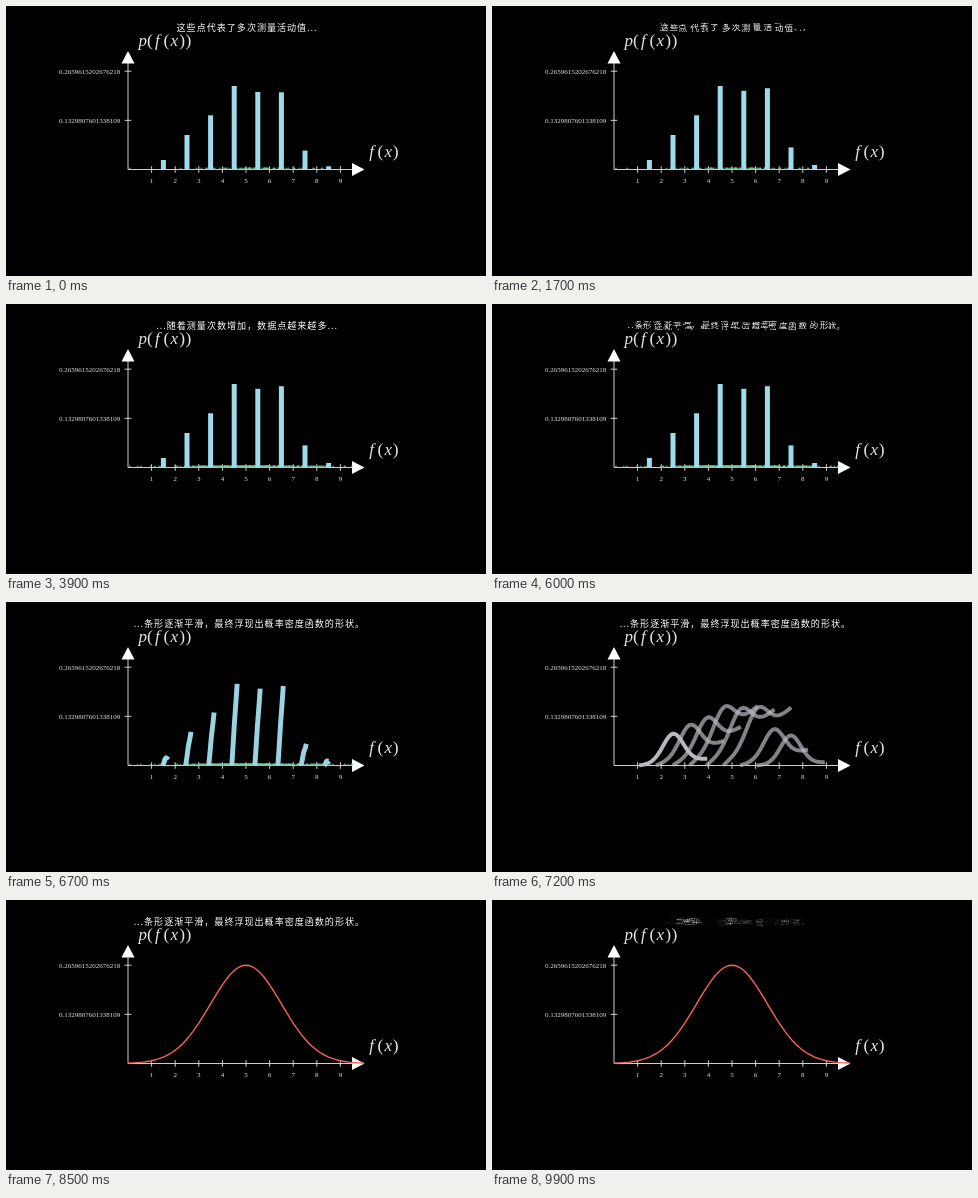
These frames come from a looping animation (480x270 px, 10000 ms). An HTML page with a canvas:

```html
<!DOCTYPE html>
<html lang="zh">
<head>
<meta charset="utf-8">
<style>
  html, body { margin: 0; width: 100%; height: 100%; overflow: hidden; background: #000; }
  canvas { display: block; width: 480px; height: 270px; }
</style>
</head>
<body>
<canvas id="stage"></canvas>
<script>
const W = 480, H = 270, LOOP = 10000, STEP = 100;
const OX = 122, OY = 163.5, UNIT = 23.6, PEAK = 98.3;
const CJK = '"Noto Sans CJK SC", "Noto Sans CJK", sans-serif';
const SERIF = '"Liberation Serif", serif';
const BLUE = [156, 220, 235], RED = [252, 98, 85];

const canvas = document.getElementById('stage');
const ratio = window.devicePixelRatio || 1;
canvas.width = W * ratio;
canvas.height = H * ratio;
const ctx = canvas.getContext('2d');
ctx.scale(ratio, ratio);

const lerp = (a, b, s) => a + (b - a) * s;
const clamp = v => Math.min(1, Math.max(0, v));
const span = (t, start, length) => clamp((t - start) / length);
const sigmoid = x => 1 / (1 + Math.exp(-x));
const smooth = t => {
  const e = sigmoid(-5);
  return clamp((sigmoid(10 * (t - 0.5)) - e) / (1 - 2 * e));
};
const noise = n => {
  const v = Math.sin(n * 12.9898 + 4.137) * 43758.5453;
  return v - Math.floor(v);
};

// ---- captions ----
const SIZE = 9.1, SPACING = 0.95, BASE = 24.8, MID = 240.6, CENTRE = 21.5;

function layout(text) {
  ctx.font = `${SIZE}px ${CJK}`;
  let x = 0;
  const glyphs = [...text].map(ch => {
    const glyph = { ch, x };
    x += ctx.measureText(ch).width + SPACING;
    return glyph;
  });
  // a closing full-width stop only inks its left part
  const ink = text.endsWith('。') ? x - SIZE * 0.6 : x - SPACING;
  glyphs.forEach(g => g.x += MID - ink / 2);
  return glyphs;
}

const captions = [
  '这些点代表了多次测量活动值...',
  '...随着测量次数增加\uff0c数据点越来越多...',
  '...条形逐渐平滑\uff0c最终浮现出概率密度函数的形状。'
].map(layout);

// Draws a glyph in rows that drift apart as shear grows.
function drawGlyph(ch, x, alpha, shear = 0, seed = 0, squash = 1) {
  if (alpha <= 0.01) return;
  ctx.globalAlpha = Math.min(1, alpha);
  if (shear < 0.01 && squash === 1) {
    ctx.fillText(ch, x, BASE);
    return;
  }
  const rowH = 3;
  for (let r = 0; r < 4; r++) {
    const dx = (noise(seed * 7 + r) - 0.5) * 4 * shear;
    const dy = (noise(seed * 11 + r + 50) - 0.5) * 2 * shear;
    ctx.save();
    ctx.translate(x + dx, CENTRE + dy);
    ctx.scale(1 - 0.15 * shear, squash);
    ctx.beginPath();
    ctx.rect(-3, -6 + r * rowH, 16, rowH);
    ctx.clip();
    ctx.fillText(ch, 0, BASE - CENTRE);
    ctx.restore();
  }
}

function morph(from, to, s) {
  const shear = 3 * s * (1 - s);
  const source = j => Math.floor(j * from.length / to.length);
  to.forEach((b, j) => {
    const a = from[source(j)];
    const copy = j > 0 && source(j - 1) === source(j);
    const x = lerp(a.x, b.x, s);
    const squash = 1 - 0.25 * shear;
    drawGlyph(a.ch, x, (copy ? s : 1) * clamp(1.8 - 2.6 * s), shear, j, squash);
    drawGlyph(b.ch, x, clamp(2.6 * s - 0.8), shear, j + 40, squash);
  });
}

function dissolve(glyphs, s) {
  const shear = clamp(s * 1.6);
  glyphs.forEach((g, i) => {
    const x = lerp(g.x, MID + (g.x - MID) * 0.36, s);
    const faded = 2.4 * noise(i + 3) ** 2 * (1 - s);
    drawGlyph(g.ch, x, lerp(1, faded, shear), shear, i, 1 - 0.55 * s);
  });
}

function drawCaption(t) {
  ctx.font = `${SIZE}px ${CJK}`;
  ctx.textAlign = 'left';
  ctx.fillStyle = '#fff';
  const still = list => list.forEach(g => drawGlyph(g.ch, g.x, 1));
  const [first, second, third] = captions;
  if (t < 1400) still(first);
  else if (t < 2400) morph(first, second, smooth(span(t, 1380, 1000)));
  else if (t < 5400) still(second);
  else if (t < 6400) morph(second, third, smooth(span(t, 5390, 1000)));
  else if (t < 9400) still(third);
  else dissolve(third, smooth(span(t, 9360, 1000)));
  ctx.globalAlpha = 1;
}

// ---- axes ----
function line(x1, y1, x2, y2) {
  ctx.beginPath();
  ctx.moveTo(x1, y1);
  ctx.lineTo(x2, y2);
  ctx.stroke();
}

function triangle(...p) {
  ctx.beginPath();
  ctx.moveTo(p[0], p[1]);
  ctx.lineTo(p[2], p[3]);
  ctx.lineTo(p[4], p[5]);
  ctx.fill();
}

// each part: [character, x offset]
function formula(parts, x, y) {
  ctx.textAlign = 'left';
  for (const [ch, dx] of parts) {
    ctx.font = /[()]/.test(ch) ? `17.5px ${SERIF}` : `italic 17px ${SERIF}`;
    ctx.fillText(ch, x + dx, y);
  }
}

function drawAxes() {
  ctx.strokeStyle = '#cfcfcf';
  ctx.fillStyle = '#fff';
  ctx.lineWidth = 1;
  line(OX, OY, 347, OY);
  line(OX, OY, OX, 57);
  triangle(346, 157, 358.5, 163.5, 346, 170);
  triangle(115.5, 57.5, 122, 45, 128.5, 57.5);

  ctx.fillStyle = '#e4e4e4';
  ctx.font = `7px ${SERIF}`;
  ctx.textAlign = 'center';
  for (let n = 1; n < 10; n++) {
    const x = OX + n * UNIT;
    line(x, 160.2, x, 166.8);
    ctx.fillText(n, x, 176.9);
  }
  ctx.textAlign = 'right';
  [['0.2659615202676218', 1], ['0.1329807601338109', 0.5]].forEach(([label, k]) => {
    const y = OY - PEAK * k;
    line(118.7, y, 125.3, y);
    ctx.fillText(label, 114.2, y + 2.3);
  });

  formula([['p', 0.6], ['(', 9], ['f', 17], ['(', 25.4], ['x', 32.4], [')', 41.2], [')', 47.6]], 132, 39.6);
  formula([['f', 2.2], ['(', 10.4], ['x', 17.4], [')', 25.8]], 361, 150.6);
}

// ---- measured points ----
const dots = Array.from({ length: 420 }, (_, i) => {
  const u = noise(i * 2 + 101) || 0.5, v = noise(i * 2 + 102);
  const z = Math.sqrt(-2 * Math.log(u)) * Math.cos(2 * Math.PI * v);
  return Math.min(346, Math.max(124, OX + UNIT * (5 + 1.7 * z)));
});

function drawDots(t) {
  const alpha = 1 - smooth(span(t, 6400, 900));
  if (alpha < 0.01) return;
  const count = 80 + 20 * span(t, 0, 700) + 320 * span(t, 2400, 2000);
  ctx.fillStyle = '#7fcca0';
  ctx.globalAlpha = 0.6 * alpha;
  dots.slice(0, Math.floor(count)).forEach(x => {
    ctx.beginPath();
    ctx.arc(x, 162.7, 1.1, 0, 2 * Math.PI);
    ctx.fill();
  });
  ctx.globalAlpha = 1;
}

// ---- bars that become the density curve ----
const topsBefore = [154, 129, 109.3, 80, 86, 86.3, 144.6, 160.3];
const topsAfter = [154, 129, 109.3, 80, 84.8, 82.2, 141.4, 159];

const density = x => OY - PEAK * Math.exp(-((x - 5) ** 2) / 4.5);

function drawShape(i, t, s) {
  const x = OX + UNIT * (i + 1.5);
  const top = lerp(topsBefore[i], topsAfter[i], span(t, 0, 700));
  const rgb = BLUE.map((c, k) => Math.round(lerp(c, RED[k], s)));
  ctx.globalAlpha = i ? 1 - s : 1;
  ctx.strokeStyle = `rgb(${rgb})`;
  ctx.lineWidth = lerp(5, 1.4, s);
  ctx.beginPath();
  const steps = 80;
  for (let k = 0; k <= steps; k++) {
    const u = k / steps;
    ctx.lineTo(lerp(x, OX + UNIT * 10 * u, s), lerp(lerp(OY, top, u), density(10 * u), s));
  }
  ctx.stroke();
}

function drawShapes(t) {
  const s = smooth(span(t, 6415, 1910));
  for (let i = topsAfter.length - 1; i >= 0; i--) {
    if (i === 0 || s < 0.995) drawShape(i, t, s);
  }
  ctx.globalAlpha = 1;
}

function draw(t) {
  ctx.fillStyle = '#000';
  ctx.fillRect(0, 0, W, H);
  drawAxes();
  drawDots(t);
  drawShapes(t);
  drawCaption(t);
}

const begin = performance.now();
function tick() {
  const t = (performance.now() - begin) % LOOP;
  draw(Math.floor(t / STEP) * STEP);
  requestAnimationFrame(tick);
}
tick();
</script>
</body>
</html>
```
